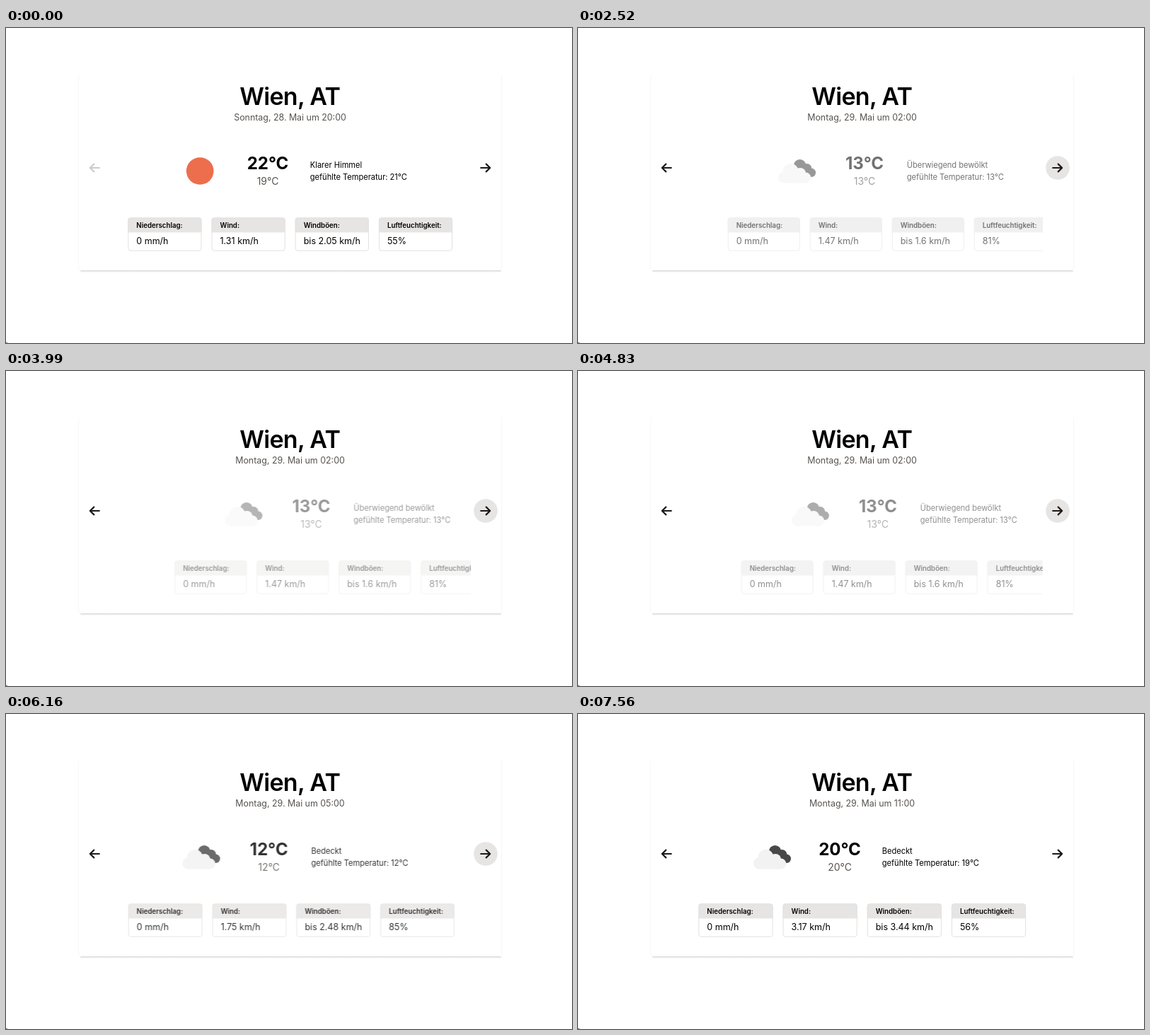
An HTML page that plays this animation: 800x446 px, repeating every 7.77 s.

```html
<!DOCTYPE html>
<html lang="de">
<head>
<meta charset="utf-8">
<title>Wetter</title>
<style>
  html, body { margin: 0; width: 100%; height: 100%; overflow: hidden; background: #fff; }
  svg { display: block; width: 100vw; height: 100vh; font-family: Inter, "Liberation Sans", sans-serif; }
  .mid { text-anchor: middle; }
  .title { font-size: 34px; font-weight: 600; letter-spacing: -.02em; }
  .date { font-size: 12.4px; fill: #57534e; }
  .temp { font-size: 24px; font-weight: 700; font-optical-sizing: none; }
  .feel { font-size: 13.9px; fill: #57534e; }
  .note { font-size: 11.05px; }
  .head { font-size: 9.7px; font-weight: 600; }
  .value { font-size: 12.5px; }
  .arrow { fill: none; stroke: #1c1917; stroke-width: 2.2; stroke-linecap: round; stroke-linejoin: round; }
</style>
</head>
<body>
<svg viewBox="0 0 800 446">
  <defs>
    <clipPath id="view"><rect x="147" y="150" width="509.5" height="185"/></clipPath>
    <linearGradient id="edge" x1="0" y1="0" x2="0" y2="1">
      <stop offset="0" stop-color="#d8d8d8"/>
      <stop offset="1" stop-color="#fff"/>
    </linearGradient>
  </defs>
  <path d="M102.7 66V339Q102.7 343.5 107.2 343.5H696Q700.5 343.5 700.5 339V66" fill="none" stroke="#f7f7f7"/>
  <rect x="105" y="343" width="595" height="3.4" rx="1.6" fill="url(#edge)"/>
  <rect x="0" y="445" width="2" height="1" fill="#777"/>

  <text class="mid title" x="401.2" y="109">Wien, AT</text>
  <text class="mid date" id="date" x="401.5" y="130.5"></text>

  <path class="arrow" id="prev" d="M131.8 198H118.8M124.3 192.6L118.8 198L124.3 203.4"/>
  <circle id="hover" cx="678" cy="198" r="16.8" fill="#e7e5e4"/>
  <path class="arrow" d="M671.2 198H684.2M678.7 192.6L684.2 198L678.7 203.4"/>

  <g clip-path="url(#view)">
    <g id="panel">
      <circle id="sun" cx="274.2" cy="202.5" r="19.3" fill="#ec6e4c"/>
      <g id="cloud" transform="translate(-.5 0)">
        <g fill="#484848">
          <circle cx="279" cy="194.6" r="8.7"/>
          <circle cx="288.8" cy="199" r="7"/>
          <circle cx="295.3" cy="204.8" r="6.2"/>
          <path d="M279 195L289 194L295 211H282Z"/>
        </g>
        <g fill="#f2f2f2">
          <circle cx="266" cy="203" r="11"/>
          <circle cx="256.6" cy="211.4" r="8.2"/>
          <circle cx="279.5" cy="206" r="8"/>
          <circle cx="287.2" cy="212" r="7.6"/>
          <rect x="256" y="205" width="31.5" height="14.6"/>
        </g>
      </g>
      <text class="mid temp" id="temp" x="370" y="200"></text>
      <text class="mid feel" id="feel" x="370" y="222.3"></text>
      <text class="note" id="sky" x="429.8" y="198.3"></text>
      <text class="note" id="felt" x="429.8" y="214.9"></text>
      <g id="boxes"></g>
    </g>
  </g>
</svg>
<script>
const LOOP = 7770, CENTER = 401.7, GAP = 14;
const $ = id => document.getElementById(id);
const clamp = v => Math.max(0, Math.min(1, v));

// date, temperature, lower temperature, felt, sky, wind, gusts, humidity, box width
const forecast = {
  20: ['Sonntag, 28. Mai um 20:00', 22, 19, 21, 'Klarer Himmel', 1.31, 2.05, 55, 104.2],
  23: ['Sonntag, 28. Mai um 23:00', 16, 15, 16, 'Überwiegend bewölkt', 1.52, 1.8, 72, 102],
  2: ['Montag, 29. Mai um 02:00', 13, 13, 13, 'Überwiegend bewölkt', 1.47, 1.6, 81, 102],
  5: ['Montag, 29. Mai um 05:00', 12, 12, 12, 'Bedeckt', 1.75, 2.48, 85, 104.8],
  8: ['Montag, 29. Mai um 08:00', 16, 16, 15, 'Bedeckt', 2.36, 2.94, 71, 105],
  11: ['Montag, 29. Mai um 11:00', 20, 20, 19, 'Bedeckt', 3.17, 3.44, 56, 105.2]
};

// [time, hour that enters]
const steps = [
  [-5000, 20], [1890, 23], [2362, 2], [3430, 5], [3887, 2],
  [4290, 5], [4712, 2], [5880, 5], [6300, 8], [6720, 11]
];

const boxes = ['Niederschlag:', 'Wind:', 'Windböen:', 'Luftfeuchtigkeit:'].map(label => {
  const g = document.createElementNS('http://www.w3.org/2000/svg', 'g');
  g.innerHTML = `
    <path class="lid" fill="#e7e5e4"/>
    <rect class="frame" x=".5" y="268.9" height="46.4" rx="3.2" fill="none" stroke="#e3e1e0"/>
    <text class="head" x="12" y="283">${label}</text>
    <text class="value" x="12" y="305.9"></text>`;
  $('boxes').append(g);
  return g;
});

function fill(hour) {
  const [date, temp, feel, felt, sky, wind, gusts, wet, width] = forecast[hour];
  $('date').textContent = date;
  $('temp').textContent = temp + '°C';
  $('feel').textContent = feel + '°C';
  $('sky').textContent = sky;
  $('felt').textContent = `gefühlte Temperatur: ${felt}°C`;
  $('sun').style.display = hour === 20 ? '' : 'none';
  $('cloud').style.display = hour === 20 ? 'none' : '';
  const values = ['0 mm/h', wind + ' km/h', `bis ${gusts} km/h`, wet + '%'];
  const left = CENTER - 2 * width - 1.5 * GAP;
  boxes.forEach((g, i) => {
    g.setAttribute('transform', `translate(${left + i * (width + GAP)} 0)`);
    g.querySelector('.value').textContent = values[i];
    g.querySelector('.frame').setAttribute('width', width - 1);
    g.querySelector('.lid').setAttribute('d',
      `M0 289.5V272Q0 268.4 3.6 268.4H${width - 3.6}Q${width} 268.4 ${width} 272V289.5Z`);
  });
}

// damped spring from 100 px to rest
function spring(ms) {
  const t = 8 * ms / 1000;
  return 100 * Math.exp(-t) * (Math.cos(t) + Math.sin(t));
}

let shown;
function draw(t) {
  const [start, hour] = steps.filter(s => s[0] <= t).pop();
  if (hour !== shown) fill(shown = hour);
  const age = t - start;
  const x = age < 800 ? spring(age) : 0;
  $('panel').setAttribute('transform', `translate(${x.toFixed(2)} 0)`);
  $('panel').setAttribute('opacity', 1 - (1 - clamp(age / 660)) ** 3);
  $('hover').setAttribute('opacity', clamp((t - 1500) / 150) - clamp((t - 6980) / 150));
  $('prev').setAttribute('opacity', t < 1890 ? .22 : 1);
}

const begin = performance.now();
function tick() {
  draw((performance.now() - begin) % LOOP);
  requestAnimationFrame(tick);
}
tick();
</script>
</body>
</html>
```
